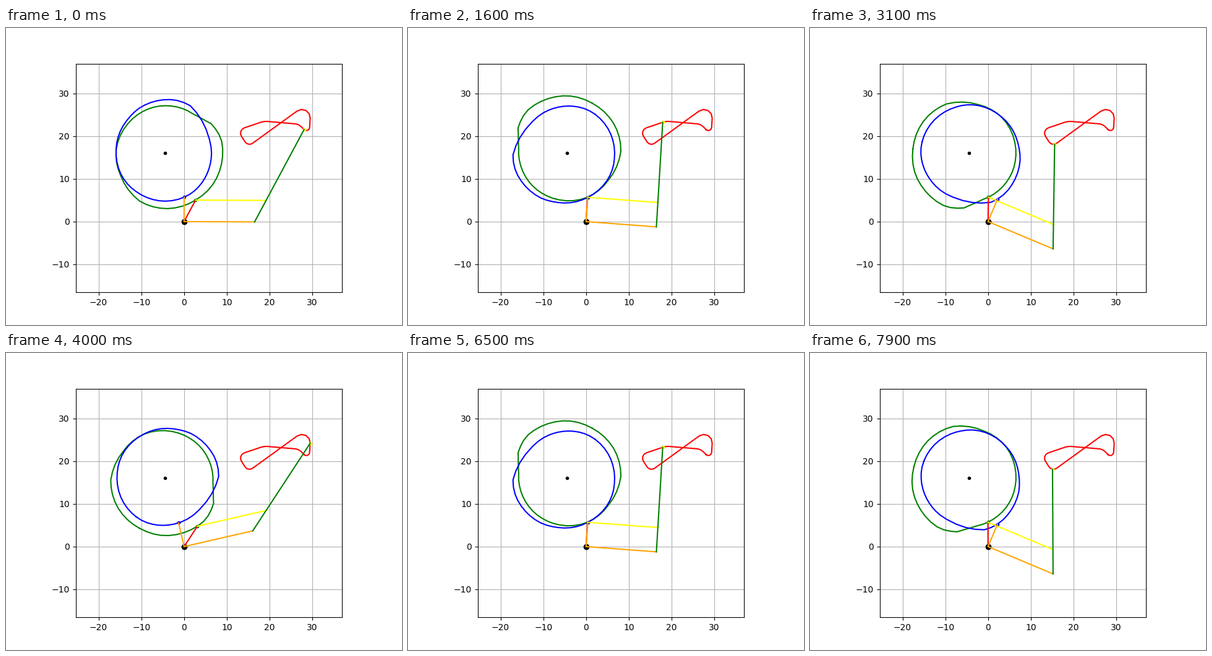
A matplotlib script that plays this animation: 640x480 px, repeating every 8000 ms.

```python
import numpy as np
import matplotlib.pyplot as plt
from matplotlib.animation import FuncAnimation

RUN = 4                         # steps per straight run and per rounded corner
FRAMES, INTERVAL = 80, 100
SHORT, LONG, BAR = 5.7, 16.5, 24.5
CAM_CENTRE = -4.5 + 16j

# The tip follows a polygon whose corners are rounded: vertex, radius.
CORNERS = [
    (26.82 + 22.80j, 2.43),
    (18.72 + 23.49j, 3.98),
    (12.50 + 21.39j, 1.32),
    (14.98 + 17.56j, 1.23),
    (29.76 + 28.26j, 1.93),
    (29.27 + 20.30j, 0.76),
]


def unit(z):
    return z / abs(z)


def fillet(before, vertex, after, radius):
    """Points on the arc that rounds a corner, both ends included."""
    heading = unit(vertex - before)
    bend = np.angle(unit(after - vertex) / heading)
    start = vertex - heading * radius * np.tan(abs(bend) / 2)
    spoke = -1j * np.sign(bend) * radius * heading
    return start - spoke + spoke * np.exp(1j * bend * np.arange(RUN + 1) / RUN)


def tip_path():
    """Closed tip path, one complex number per step."""
    n = len(CORNERS)
    arcs = [fillet(CORNERS[k - 1][0], v, CORNERS[(k + 1) % n][0], r)
            for k, (v, r) in enumerate(CORNERS)]
    parts = []
    for k, arc in enumerate(arcs):
        parts += [np.linspace(arcs[k - 1][-1], arc[0], RUN + 1)[:-1], arc[:-1]]
    path = np.concatenate(parts)
    return np.append(path, path[0])


def solve_linkage(tip):
    """Elbow and the two follower points for a given tip."""
    dist = np.abs(tip)
    inner = np.arccos((LONG**2 + dist**2 - BAR**2) / (2 * LONG * dist))
    crank = np.exp(1j * (np.angle(tip) - inner))
    elbow = LONG * crank
    arm = SHORT * (tip - elbow) / BAR
    return elbow, arm, SHORT * 1j * crank


tip = tip_path()
elbow, arm, lever = solve_linkage(tip)
turn = np.exp(1j * np.linspace(0, 2 * np.pi, len(tip)))
arm_cam = (arm - CAM_CENTRE) / turn
lever_cam = (lever - CAM_CENTRE) / turn

fig, ax = plt.subplots(figsize=(6.4, 4.8), dpi=100)
ax.set_aspect("equal")
ax.set_xlim(-25.35, 37)
ax.set_ylim(-16.55, 36.95)
ax.grid(True)


def curve(color, fmt="-"):
    return ax.plot([], [], fmt, color=color)[0]


def place(line, *points):
    z = np.hstack(points)
    line.set_data(z.real, z.imag)


ax.plot(0, 0, "o", color="black")
ax.plot(CAM_CENTRE.real, CAM_CENTRE.imag, ".", color="black")
ax.plot(tip.real, tip.imag, color="red")
arm_cam_line, lever_cam_line = curve("green"), curve("blue")
arm_dot, lever_dot, tip_dot = (curve(c, ".") for c in ("green", "blue", "yellow"))
arm_line, link_line, crank_line, bar_line = map(curve, ("red", "yellow", "orange", "green"))


def draw(frame):
    i = frame % len(tip)
    place(arm_cam_line, CAM_CENTRE + arm_cam * turn[i])
    place(lever_cam_line, CAM_CENTRE + lever_cam * turn[i])
    place(arm_dot, arm[i])
    place(lever_dot, lever[i])
    place(tip_dot, tip[i])
    place(arm_line, 0j, arm[i])
    place(link_line, arm[i], arm[i] + elbow[i])
    place(crank_line, lever[i], 0j, elbow[i])
    place(bar_line, elbow[i], tip[i])
    return (arm_cam_line, lever_cam_line, arm_dot, lever_dot, tip_dot,
            arm_line, link_line, crank_line, bar_line)


anim = FuncAnimation(fig, draw, frames=FRAMES, interval=INTERVAL, repeat=True, repeat_delay=0)
plt.show()
```
